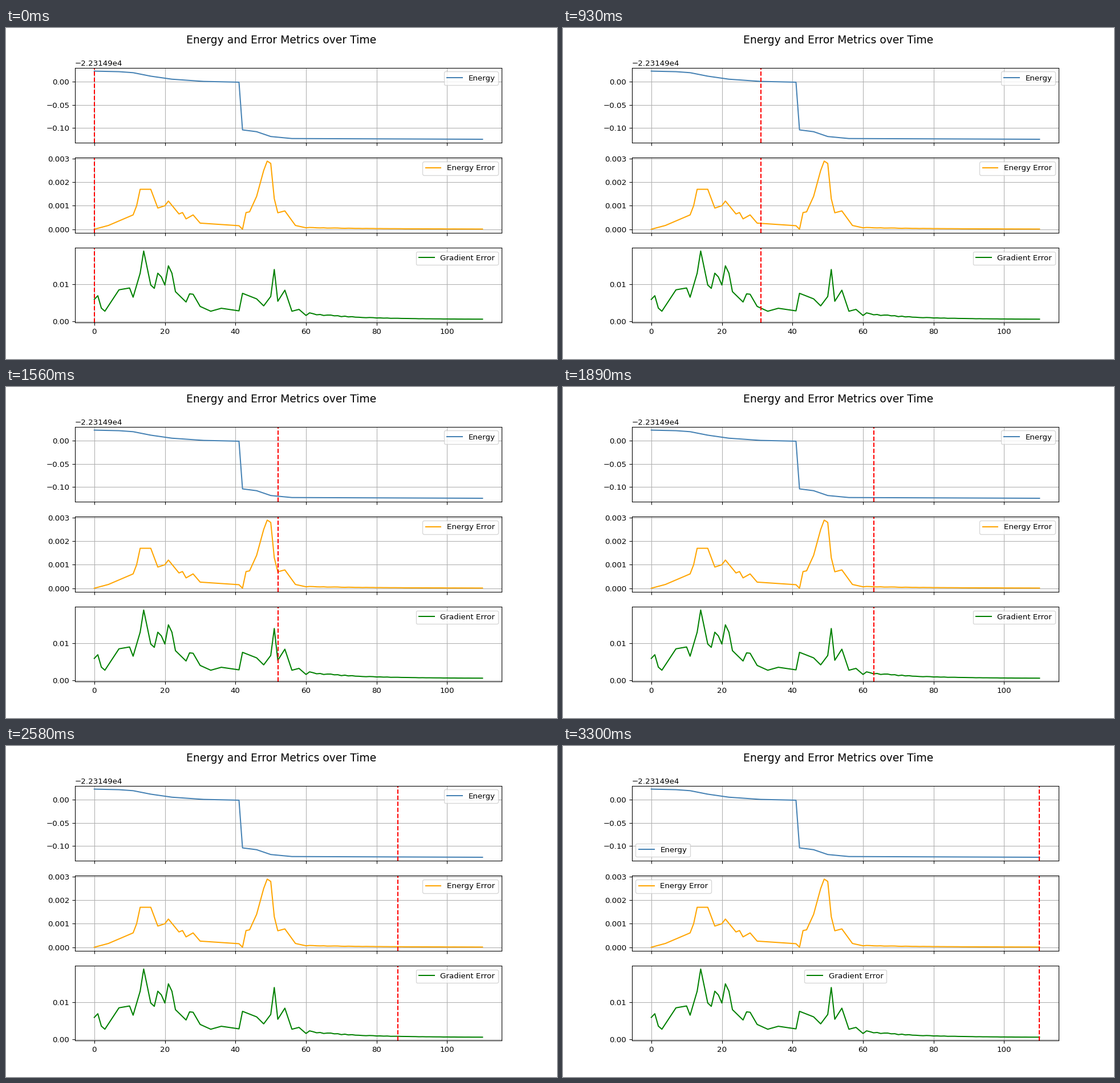
Write a matplotlib script that moves like this. It is 966 by 580 pixels and loops after 3.33 s.

```python
import numpy as np
import matplotlib.pyplot as plt
from matplotlib.animation import FuncAnimation

WIDTH, HEIGHT, DPI = 966, 580, 96.6
STEPS = 111
BASE_ENERGY = -22314.9
SETTLED = 60  # step after which both errors only fade out

steps = np.arange(STEPS)
rng = np.random.default_rng(4)


def curve(*knots):
    """Piecewise linear curve through (step, value) knots."""
    x, y = zip(*knots)
    return np.interp(steps, x, y)


def fade_out(values, floor, height, length):
    """Replace the settled part by a slightly rough exponential decay."""
    decay = height * np.exp(-(steps - SETTLED) / length)
    rough = 1 + 0.12 * rng.uniform(-1, 1, STEPS)
    return np.where(steps > SETTLED, floor + decay * rough, values)


# All curves are given in thousandths.
energy = curve(
    (0, 23.5), (7, 22.3), (11, 20.1), (16, 12.5), (22, 5.9), (31, 1.1),
    (41, -0.6), (42, -104.5), (46, -108.5), (50, -119), (56, -123.4),
    (110, -125))

energy_error = fade_out(curve(
    (0, 0), (4, 0.16), (11, 0.61), (12, 1), (13, 1.7), (16, 1.7),
    (18, 0.9), (20, 1), (21, 1.2), (24, 0.65), (25, 0.71), (26, 0.44),
    (28, 0.61), (30, 0.26), (41, 0.15), (42, 0), (43, 0.71), (44, 0.74),
    (46, 1.4), (48, 2.5), (49, 2.9), (50, 2.8), (51, 1.3), (52, 0.7),
    (54, 0.78), (57, 0.16), (60, 0.06)), 0, 0.07, 22)

gradient_error = fade_out(curve(
    (0, 5.9), (1, 6.9), (2, 3.55), (3, 2.7), (7, 8.5), (10, 9), (11, 6.5),
    (13, 13), (14, 19), (16, 9.8), (17, 8.9), (18, 13), (19, 12),
    (20, 9.8), (21, 15), (22, 13), (23, 8), (26, 5.2), (27, 7.4),
    (28, 7.3), (30, 4), (33, 2.7), (36, 3.5), (41, 2.8), (42, 7.55),
    (46, 6.05), (48, 4.15), (50, 6.7), (51, 14), (52, 5.4), (54, 8.4),
    (56, 2.7), (58, 3.2), (60, 1.55)), 0.5, 1.7, 14)

panels = [
    ("Energy", BASE_ENERGY + energy / 1000, "steelblue"),
    ("Energy Error", energy_error / 1000, "orange"),
    ("Gradient Error", gradient_error / 1000, "green"),
]

plt.rcParams["font.family"] = "DejaVu Sans"
fig, axes = plt.subplots(3, 1, figsize=(WIDTH / DPI, HEIGHT / DPI), dpi=DPI,
                         sharex=True)
fig.suptitle("Energy and Error Metrics over Time", fontsize=14)

cursors = []
for ax, (label, values, color) in zip(axes, panels):
    ax.plot(steps, values, color=color, label=label)
    cursors.append(ax.axvline(0, color="red", linestyle="--"))
    ax.grid(True)
    # "best" lets the legend jump away from the cursor.
    ax.legend(loc="best")
axes[0].ticklabel_format(axis="y", useOffset=BASE_ENERGY)


def update(step):
    for cursor in cursors:
        cursor.set_xdata([step, step])
    return cursors


anim = FuncAnimation(fig, update, frames=STEPS, interval=30, repeat=True)
plt.show()
```
